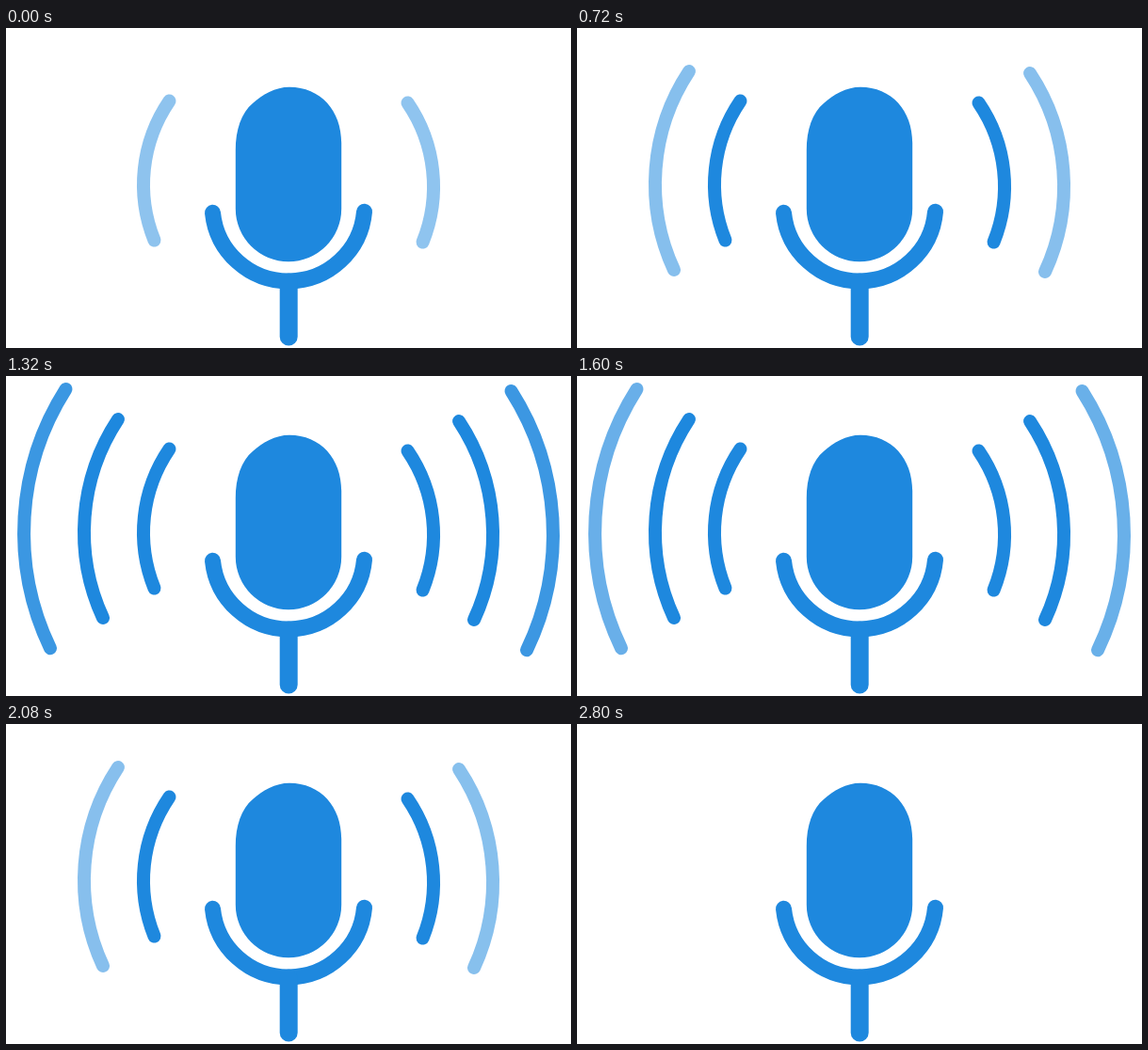
Animation, 600 px wide and 340 px high, one loop 3 s. Source, as an HTML page:

```html
<!DOCTYPE html>
<html lang="en">
<head>
<meta charset="utf-8">
<title>Microphone</title>
<style>
  html, body { margin: 0; width: 100%; height: 100%; overflow: hidden; background: #fff; }
  svg { display: block; width: 100%; height: 100%; fill: none; stroke: #1e88de; stroke-linecap: round; }
  .body { fill: #1e88de; stroke: none; }
  .wave { stroke-width: 14; animation: 3s linear infinite; }
  .inner { animation-name: inner; }
  .middle { animation-name: middle; }
  .outer { animation-name: outer; }

  /* each fade takes 600 ms; the inner pair starts half faded in */
  @keyframes inner {
    0% { opacity: .5; }
    10%, 73.333% { opacity: 1; }
    93.333%, 100% { opacity: 0; }
  }
  @keyframes middle {
    0%, 13.333% { opacity: 0; }
    33.333%, 60% { opacity: 1; }
    80%, 100% { opacity: 0; }
  }
  @keyframes outer {
    0%, 26.667% { opacity: 0; }
    46.667% { opacity: 1; }
    66.667%, 100% { opacity: 0; }
  }
</style>
</head>
<body>
<svg viewBox="0 0 600 340">
  <g>
    <path class="wave inner" d="M173.5 77.5A157.5 157.5 0 0 0 157.5 225.5"/>
    <path class="wave middle" d="M119 46A217.5 217.5 0 0 0 103 257"/>
    <path class="wave outer" d="M63.5 14A284 284 0 0 0 47 289.3"/>
  </g>
  <g transform="matrix(-1 0 0 1 600 2)">
    <path class="wave inner" d="M173.5 77.5A157.5 157.5 0 0 0 157.5 225.5"/>
    <path class="wave middle" d="M119 46A217.5 217.5 0 0 0 103 257"/>
    <path class="wave outer" d="M63.5 14A284 284 0 0 0 47 289.3"/>
  </g>
  <path class="body" d="M243.8 130C243.8 108 250 90 262 80C272 71 286 62.8 301 62.8C334 62.8 356.2 88 356.2 122V192A56.2 56.2 0 0 1 243.8 192Z"/>
  <path stroke-width="17" d="M219.5 196.3A80.87 80.87 0 0 0 380.5 195.3"/>
  <path stroke-width="19" d="M300.2 270V328"/>
</svg>
</body>
</html>
```
